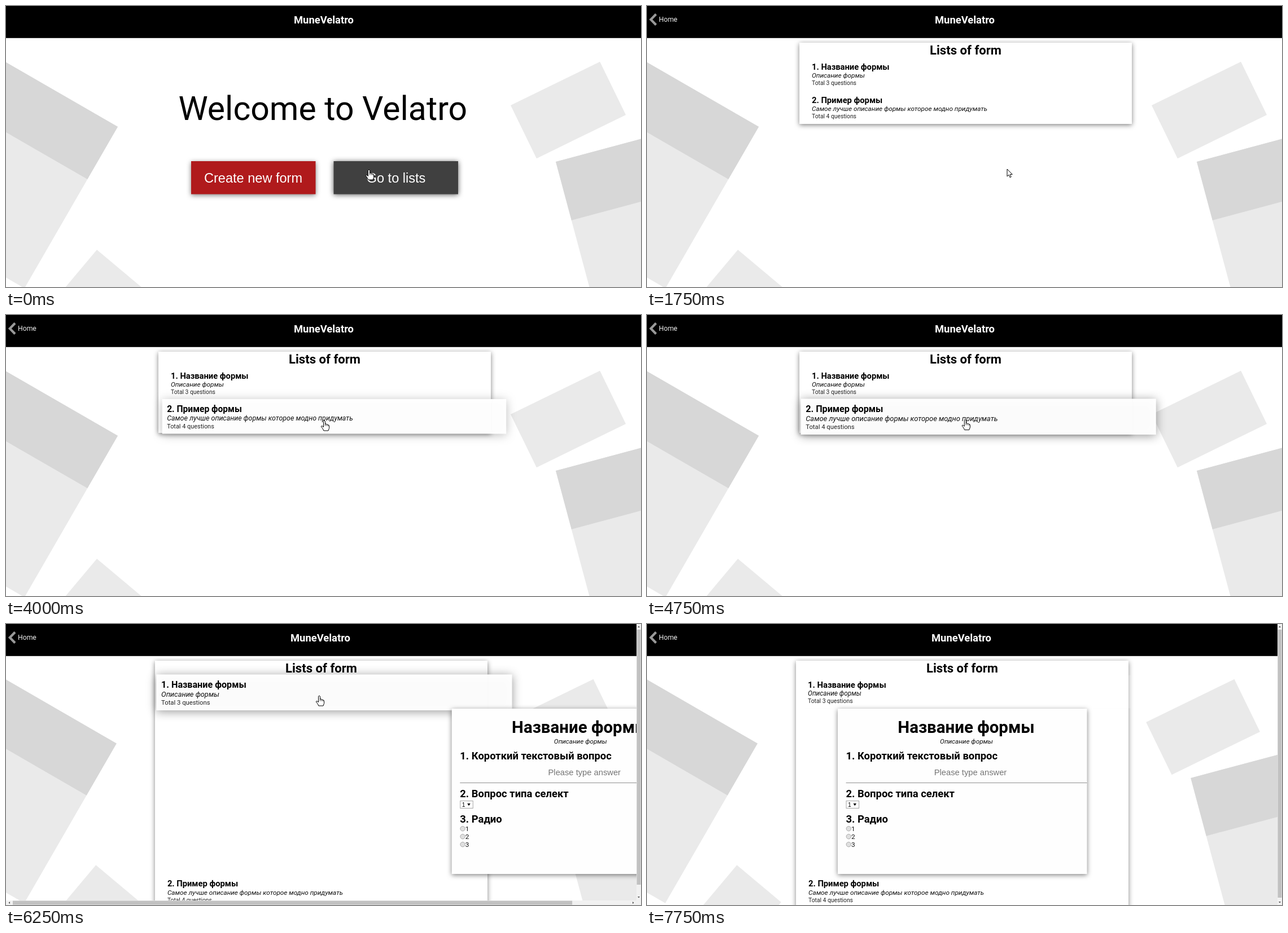
Recreate the animation shown at these times as an HTML page. Size 1125 by 498 pixels, loop 8000 ms.

```html
<!DOCTYPE html>
<html lang="en">
<head>
<meta charset="utf-8">
<title>Form lists</title>
<style>
  html, body { margin: 0; width: 100%; height: 100%; overflow: hidden; background: #fff; }
  svg { display: block; width: 1125px; height: 498px; }
  text { font-family: Roboto, sans-serif; white-space: pre; }
  .b { font-weight: 700; }
  .i { font-style: italic; }
  .arial { font-family: "Liberation Sans", Arial, sans-serif; }
  .mid { text-anchor: middle; }
  .raised { filter: drop-shadow(0 2px 4px rgba(0, 0, 0, .5)); }
</style>
</head>
<body>
<svg id="stage" viewBox="0 0 1125 498"></svg>
<script>
const LOOP = 8000, STEP = 250;
const OPEN_PAGE = 1750, OPEN_FORM = 6100, SLIDE = 500;
const HOVER_1 = [5000, 7000], HOVER_2 = [3700, 4850], HOVER_EASE = 316;
const ORIGIN_X = 406, FORM_GAP = 293.5;
const EM = 14.72;

const text = (x, y, em, str, cls = '', fill = '#000') =>
  `<text x="${x}" y="${y}" font-size="${em * EM}" class="${cls}" fill="${fill}">${str}</text>`;
const rect = (x, y, w, h, fill, extra = '') =>
  `<rect x="${x}" y="${y}" width="${w}" height="${h}" fill="${fill}" ${extra}/>`;
const poly = (points, fill) => `<polygon points="${points}" fill="${fill}"/>`;

// A tilted sheet of paper, with a darker head when head > 0.
const sheet = (x, y, angle, left, w, head, body) =>
  `<g transform="translate(${x} ${y}) rotate(${angle})">
  ${rect(left, 0, w, head + body, '#eaeaea')}${rect(left, 0, w, head, '#d7d7d7')}</g>`;

// Card content is laid out around its scaling origin.
const card = (id, title, note, total) => `<g id="${id}">
  ${rect(284 - ORIGIN_X, -16.3, 575, 58, '#fff', 'fill-opacity=".96"')}
  ${text(292 - ORIGIN_X, 5.2, 1, title, 'b')}
  ${text(292 - ORIGIN_X, 20, .8, note, 'i', '#111')}
  ${text(292 - ORIGIN_X, 32.8, .7, total, '', '#222')}</g>`;

const radio = n => {
  const y = 348.7 + 14 * n;
  return `<circle cx="357.3" cy="${y}" r="4.2" fill="#e0e0e0" stroke="#a2a2a2" stroke-width=".9"/>` +
    text(362, y + 4.6, .8, n, '', '#111');
};

const stage = document.getElementById('stage');
stage.innerHTML = `
<g id="back">
  ${sheet(198, 214, 30, -260, 260, 107.5, 223)}
  ${sheet(161, 432, 40, 0, 103.5, 0, 150)}
  ${sheet(894, 176, -26, 0, 176, 0, 104.8)}
  ${sheet(974, 276, -15, 0, 260, 107.5, 223)}
</g>
${rect(0, 0, 1125, 56.8, '#000')}
<g id="brand">${text(510, 30.5, 1.25, 'MuneVelatro', 'b', '#fff')}</g>
<g id="home">
  ${text(305.5, 201.5, 4, 'Welcome to Velatro')}
  ${rect(328, 275, 220.5, 58.5, '#b01a1c', 'class="raised"')}
  ${rect(580.5, 275, 220.5, 58.5, '#404040', 'id="go"')}
  ${text(438, 312.5, 1.6, 'Create new form', 'arial mid', '#fff')}
  ${text(691, 312.5, 1.6, 'Go to lists', 'arial mid', '#fff')}
</g>
<g id="lists">
  <path d="M16 14.5L6.8 24 16 33.5" fill="none" stroke="#999" stroke-width="4.2"/>
  ${text(21, 28.4, .83, 'Home', '', '#eee')}
  <g id="body">
    ${rect(270, 65, 589, 144, '#fff', 'id="panel" class="raised"')}
    ${text(564.5, 86, 1.5, 'Lists of form', 'b mid')}
    ${card('card2', '2. Пример формы', 'Самое лучше описание формы которое модно придумать', 'Total 4 questions')}
    ${card('card1', '1. Название формы', 'Описание формы', 'Total 3 questions')}
    <g id="form">
      ${rect(338, 150, 441.5, 293, '#fefefe', 'class="raised"')}
      ${text(565.5, 193.3, 2, 'Название формы', 'b mid')}
      ${text(566, 212.3, .8, 'Описание формы', 'i mid', '#111')}
      ${text(352.5, 240, 1.25, '1. Короткий текстовый вопрос', 'b')}
      ${text(573, 268, 1, 'Please type answer', 'arial mid', '#757575')}
      ${rect(352.5, 281, 427, 1, '#8f8f8f')}
      ${text(352.5, 307, 1.25, '2. Вопрос типа селект', 'b')}
      ${rect(353, 313.5, 22.5, 13, '#fff', 'stroke="#a5a5a5"')}
      ${text(356, 323.6, .7, '1', 'arial')}
      ${poly('365.5,318 371,318 368.2,322.3', '#000')}
      ${text(352.5, 352, 1.25, '3. Радио', 'b')}
      ${[1, 2, 3].map(radio).join('')}
    </g>
  </g>
  <g id="bars">
    ${rect(1117, 0, 8, 498, '#f1f1f1')}
    ${rect(1117.5, 10, 7, 475, '#c1c1c1', 'id="vthumb"')}
    ${poly('1119,6 1123,6 1121,3.5', '#505050')}
    <g id="down">${poly('1119,492 1123,492 1121,494.5', '#505050')}</g>
    <g id="hbar">
      ${rect(0, 490, 1125, 8, '#f1f1f1')}
      ${rect(12, 490.5, 993, 7, '#c1c1c1', 'id="hthumb"')}
      ${poly('7,492 7,496 4.5,494', '#505050')}
      ${poly('1110,492 1110,496 1112.5,494', '#505050')}
    </g>
  </g>
</g>
<g id="pointer" stroke-linejoin="round">
  <g id="hand" fill="#fff" stroke="#000">
    <path d="M-1.5 1.2Q0-1 1.5 1.2V6.2Q3.5 5 4.2 7 6 6.3 6.8 8 8.6 7.8 8.6 9.5V13.5L7 18H-1.2Q-2-1.2 15-5.6 10.8-5.5 8.5-3 10.2L-1.5 11.6Z" id="palm"/>
    <path d="M1.5 6V9.5M4.2 7V9.8M6.8 8V10.3" stroke-width=".8"/>
  </g>
  <path id="arrow" d="M0 0V13L3 10.2 5 14.8 7.2 13.9 5.2 9.4H9.2Z" fill="#fff" stroke="#000"/>
  <path id="beam" d="M-2.5-7.5H2.5M0-7.5V7.5M-2.5 7.5H2.5" fill="none" stroke="#000"/>
</g>`;

const el = {};
stage.querySelectorAll('[id]').forEach(n => el[n.id] = n);
el.palm.setAttribute('d', 'M-1.5 1.2Q0-1 1.5 1.2V6.2Q3.5 5 4.2 7 6 6.3 6.8 8 8.6 7.8 8.6 9.5V13.5L7 18H-1.2Q-2 15-5.6 10.8-5.5 8.5-3 10.2L-1.5 11.6Z');
const show = (node, on) => node.setAttribute('display', on ? 'inline' : 'none');
const move = (node, x, y, s = 1) => node.setAttribute('transform', `translate(${x} ${y}) scale(${s})`);
const progress = (t, from, to) => Math.min(1, Math.max(0, (t - from) / (to - from)));
const smooth = p => p * p * (3 - 2 * p);

// Mouse moves: start time, end time, place reached.
const moves = [[250, 750, 638, 289], [2500, 4000, 564, 187], [4700, 5250, 555, 127], [7000, 7500, 513, 272]];

function mouse(t) {
  let x = 643, y = 290;
  for (const [from, to, x1, y1] of moves) {
    const p = smooth(progress(t, from, to));
    x += (x1 - x) * p;
    y += (y1 - y) * p;
  }
  return [x, y];
}

// Extra scale of a card hovered between two times.
function growth(t, [on, off]) {
  const fade = since => Math.exp(-Math.max(0, t - since) / HOVER_EASE);
  return .098 * (1 - fade(on)) * fade(off);
}

function placeCard(node, y, grow) {
  move(node, ORIGIN_X, y, 1 + grow);
  const box = node.firstElementChild;
  box.style.opacity = Math.min(1, 18 * grow);
  box.style.filter = `drop-shadow(0 2px 8px rgba(0, 0, 0, ${4.5 * grow}))`;
}

function drawPointer(t, onHome) {
  const [x, y] = mouse(t);
  const hand = onHome || (t >= HOVER_2[0] && t <= HOVER_1[1]);
  const beam = t > HOVER_1[1] && y > 250;
  move(el.pointer, x, y);
  show(el.pointer, t < 7750);
  show(el.hand, hand);
  show(el.beam, beam);
  show(el.arrow, !hand && !beam);
}

function draw(t) {
  const onHome = t < OPEN_PAGE, open = t >= OPEN_FORM;
  show(el.home, onHome);
  show(el.lists, !onHome);
  const hover = 5 + 2 * progress(t, 0, 750);
  el.go.style.filter = `drop-shadow(0 1px ${hover}px rgba(0, 0, 0, .65))`;

  const shift = open ? -6 : 0, gap = open ? FORM_GAP : 0;
  move(el.back, 0, 0, open ? .989 : 1);
  move(el.brand, shift, 0);
  move(el.body, shift, 0);
  el.panel.setAttribute('height', 144 + gap);
  placeCard(el.card1, 107.3, growth(t, HOVER_1));
  placeCard(el.card2, 166.3 + gap, growth(t, HOVER_2));

  const left = 1 - progress(t, OPEN_FORM, OPEN_FORM + SLIDE);
  const offset = 922 * left * left;
  const top = offset > 0 ? el.form : el.card1;
  if (el.body.lastElementChild !== top) el.body.append(top);
  show(el.form, open);
  move(el.form, offset - shift, 0);

  const wide = 780 + offset > 1117;
  show(el.bars, open);
  show(el.hbar, wide);
  el.vthumb.setAttribute('height', wide ? 452 : 475);
  move(el.down, 0, wide ? -9 : 0);
  el.hthumb.setAttribute('width', 1093 * Math.min(1, 1117 / (780 + offset)));

  drawPointer(t, onHome);
}

let start;
function tick(now) {
  start ??= now;
  const t = (now - start) % LOOP;
  draw(Math.floor(t / STEP) * STEP);
  requestAnimationFrame(tick);
}
draw(0);
requestAnimationFrame(tick);
</script>
</body>
</html>
```
